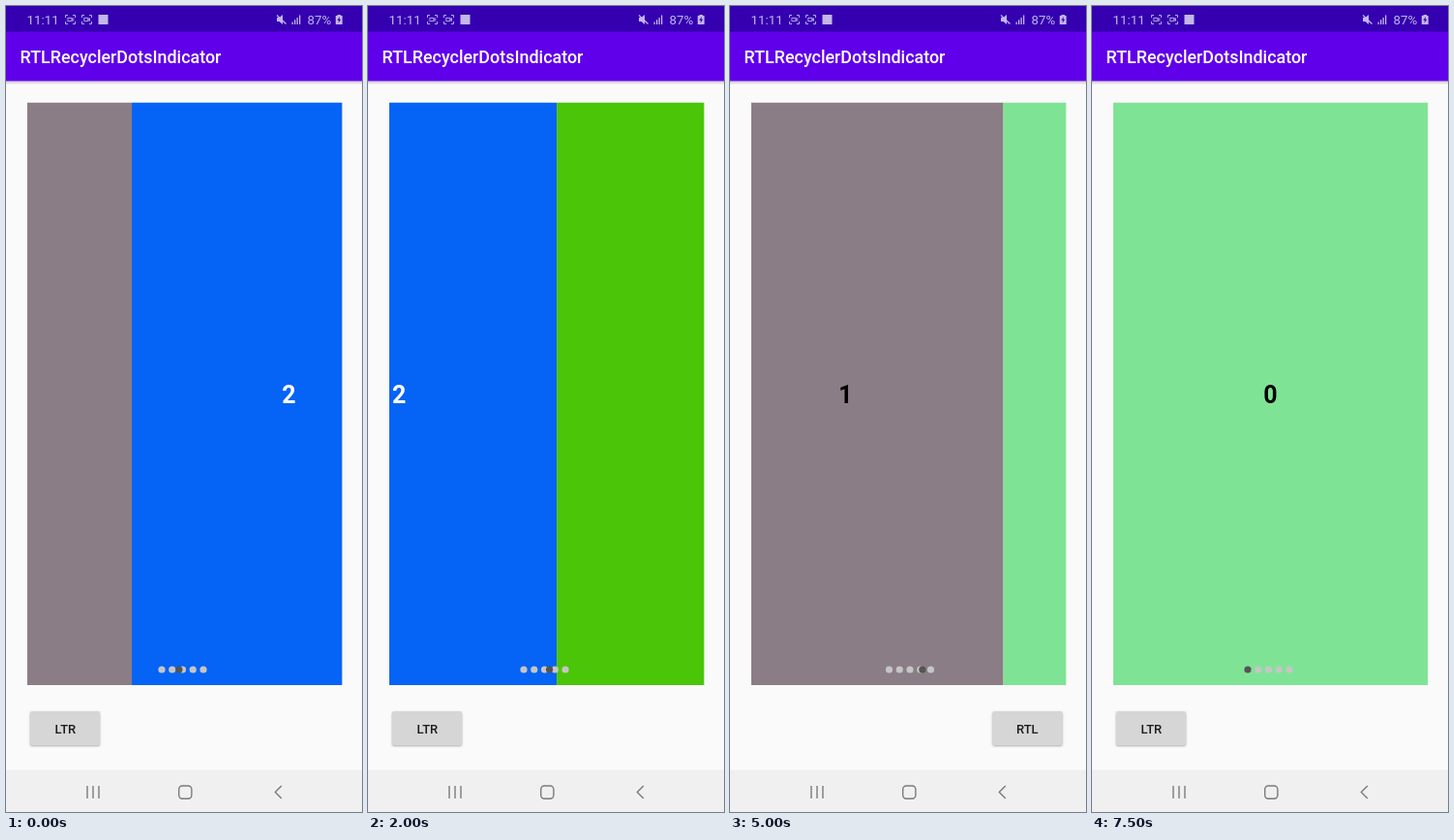
Write an HTML page that moves like this. It is 368 by 832 pixels and loops after 8 s.

```html
<!DOCTYPE html>
<html lang="en">
<head>
<meta charset="utf-8">
<title>Dots indicator</title>
<style>
@property --p { syntax: "<number>"; inherits: true; initial-value: 0; }
@property --dir { syntax: "<number>"; inherits: true; initial-value: 1; }
@property --left { syntax: "<number>"; inherits: true; initial-value: 0; }
@property --right { syntax: "<number>"; inherits: true; initial-value: 0; }

html, body { margin: 0; width: 100%; height: 100%; overflow: hidden; background: #fafafa; }
svg { display: block; width: 368px; height: 832px; font-family: Roboto, sans-serif; }

/* --p: scroll position in pages, --dir: 1 for LTR, -1 for RTL */
.screen { animation: scroll 8s step-end infinite, mode 8s step-end infinite, edges 8s step-end infinite; }
.page { transform: translateX(calc((var(--i) - var(--p)) * var(--dir) * 325.4px)); }
.page text { font-size: 25px; font-weight: 700; text-anchor: middle; }
.dots { fill: #c5c5c5; transform: translateX(calc((1 - var(--dir)) * 1.75px)); }
.current { fill: #555; transform: translateX(calc((var(--p) - 2) * var(--dir) * 10.75px)); }
.glow { fill: #5f00e8; }
.glow.l { opacity: calc(var(--left) * .17); transform: translateX(calc(var(--left) * 52px)); }
.glow.r { opacity: calc(var(--right) * .17); transform: translateX(calc(var(--right) * -52px)); }
.button text { font-size: 13px; font-weight: 500; fill: #1c1c1c; text-anchor: middle; }
.button rect { fill: #d6d6d6; filter: drop-shadow(0 1px 1px rgba(0,0,0,.32)); }
.ltr { opacity: calc((1 + var(--dir)) / 2); }
.rtl { opacity: calc((1 - var(--dir)) / 2); }
.blink { animation: blink 8s step-end infinite; }

@keyframes scroll {
  0% { --p: 1.668; }
  3.125% { --p: 2.15; }
  6.25% { --p: 2.9; }
  9.375% { --p: 3.7; }
  12.5% { --p: 4; }
  21.875% { --p: 3.5; }
  25% { --p: 2.468; }
  28.125% { --p: 1.3; }
  31.25% { --p: .305; }
  34.375% { --p: 0; }
  59.375% { --p: .25; }
  62.5% { --p: .8; }
  65.625% { --p: 1.4; }
  68.75% { --p: 2.05; }
  71.875% { --p: 2.735; }
  75% { --p: 3.5; }
  78.125% { --p: 4; }
  84.375% { --p: 3.1; }
  87.5% { --p: 1.7; }
  90.625% { --p: .4; }
  93.75%, 100% { --p: 0; }
}
@keyframes mode {
  0% { --dir: 1; }
  56.25% { --dir: -1; }
  93.75%, 100% { --dir: 1; }
}
@keyframes edges {
  0% { --left: 0; --right: 0; }
  12.5% { --left: 0; --right: 1; }
  15.625% { --left: 0; --right: .5; }
  18.75% { --left: 0; --right: 0; }
  34.375% { --left: .5; --right: 0; }
  37.5% { --left: 1; --right: 0; }
  40.625% { --left: .5; --right: 0; }
  43.75% { --left: 0; --right: 0; }
  78.125% { --left: .8; --right: 0; }
  81.25% { --left: .5; --right: 0; }
  84.375%, 100% { --left: 0; --right: 0; }
}
@keyframes blink {
  0%, 18.75%, 37.5%, 56.25%, 75%, 93.75%, 100% { opacity: 1; }
  12.5%, 31.25%, 50%, 68.75%, 87.5% { opacity: 0; }
}
</style>
</head>
<body>
<svg class="screen" viewBox="0 0 368 832">
  <defs>
    <clipPath id="pager"><rect x="22" y="99.5" width="325.4" height="601.5"/></clipPath>
    <linearGradient id="shade" x2="0" y2="1">
      <stop stop-color="#000" stop-opacity=".2"/>
      <stop offset="1" stop-color="#000" stop-opacity="0"/>
    </linearGradient>
    <path id="corners" d="M0 3V.5H2.5M7.5.5H10V3M10 7V9.5H7.5M2.5 9.5H0V7"/>
    <path id="camera" d="M2.3 3.3H6.3V6.7H2.3ZM6.3 4.5L8 3.7V6.3L6.3 5.5"/>
  </defs>

  <rect width="368" height="832" fill="#fafafa"/>
  <rect y="77.5" width="368" height="4" fill="url(#shade)"/>
  <rect y="26" width="368" height="51.5" fill="#6000ea"/>
  <rect width="368" height="26.5" fill="#3500b0"/>

  <g fill="#c4b6e8" font-size="13.3">
    <text x="21.5" y="19">11:11</text>
    <text x="311.5" y="19">87%</text>
    <rect x="95.5" y="9" width="10" height="10"/>
    <path d="M280 12H282.5L286 9V19L282.5 16H280Z"/>
    <path d="M280 9.5L289.5 18.5" fill="none" stroke="#c4b6e8" stroke-width="1.3"/>
    <path d="M295.5 16.5h1.3V19h-1.3ZM298 14.3h1.3V19H298ZM300.5 12h1.3v7h-1.3ZM303 9.5h1.3V19H303Z"/>
    <path d="M342.5 9H346V10H347.7V19H340.8V10H342.5Z"/>
    <path d="M345 11L342.3 14.7H344L343.5 17.7L346.3 13.8H344.6Z" fill="#3500b0"/>
  </g>
  <g fill="none" stroke="#b9aae2">
    <use href="#corners" x="61.5" y="9"/>
    <use href="#camera" class="blink" x="61.5" y="9"/>
    <use href="#corners" x="78.5" y="9"/>
    <use href="#camera" x="78.5" y="9"/>
  </g>
  <text x="14.5" y="59" font-size="17.9" font-weight="500" fill="#fff">RTLRecyclerDotsIndicator</text>

  <g clip-path="url(#pager)">
    <g id="pages"></g>
    <circle class="glow l" cx="-1246" cy="400" r="1268"/>
    <circle class="glow r" cx="1615.4" cy="400" r="1268"/>
    <g class="dots">
      <circle cx="161" cy="685" r="3.6"/>
      <circle cx="171.75" cy="685" r="3.6"/>
      <circle cx="182.5" cy="685" r="3.6"/>
      <circle cx="193.25" cy="685" r="3.6"/>
      <circle cx="204" cy="685" r="3.6"/>
      <circle class="current" cx="182.5" cy="685" r="3.6"/>
    </g>
  </g>

  <g class="button ltr">
    <rect x="25" y="728" width="72" height="35" rx="1.8"/>
    <text x="61.3" y="750.5">LTR</text>
  </g>
  <g class="button rtl">
    <rect x="271.5" y="728" width="72" height="35" rx="1.8"/>
    <text x="307.3" y="750.5">RTL</text>
  </g>

  <rect y="788.5" width="368" height="43.5" fill="#f0f0f0"/>
  <g fill="none" stroke="#7b7b7b" stroke-width="1.4">
    <path d="M84 805V818M90 805V818M96 805V818"/>
    <rect x="178.7" y="805" width="13.2" height="13.2" rx="3.6"/>
    <path d="M284.8 805L278.3 811.5L284.8 818"/>
  </g>
</svg>
<script>
const pages = [
  ["#7fe395", "#000"],
  ["#8b7d85", "#000"],
  ["#0563f6", "#fff"],
  ["#4ac507", "#000"],
  ["#2f0030", "#fff"]
];
document.getElementById("pages").innerHTML = pages.map(([back, ink], i) =>
  `<g class="page" style="--i:${i}">
    <rect x="22" y="99.5" width="325.4" height="601.5" fill="${back}"/>
    <text x="184.5" y="410.3" fill="${ink}">${i}</text>
  </g>`).join("");
</script>
</body>
</html>
```
